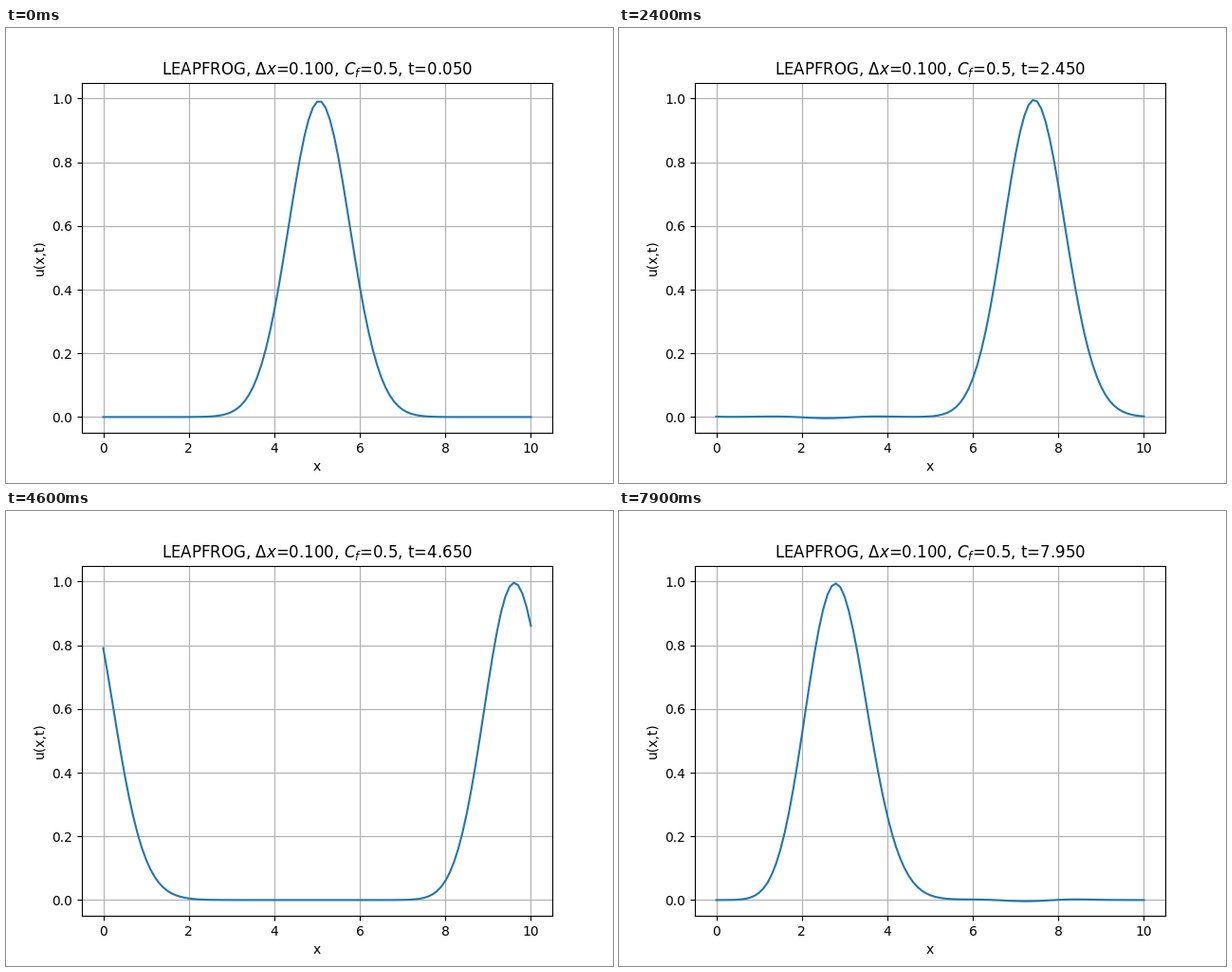
A matplotlib script for the animation above (8 s loop, 640 by 480 pixels).

```python
import numpy as np
import matplotlib.pyplot as plt
from matplotlib.animation import FuncAnimation

FRAMES, INTERVAL = 80, 100
STEPS_PER_FRAME = 2
DX, CF = 0.1, 0.5
DT = CF * DX

x = np.linspace(0, 10, 101)


def left(u):
    return np.roll(u, 1)


def right(u):
    return np.roll(u, -1)


def solve(n_steps):
    """Periodic advection: Lax-Friedrichs start, then leapfrog."""
    u0 = np.exp(-(x - 5) ** 2)
    u1 = 0.5 * (right(u0) + left(u0)) - 0.5 * CF * (right(u0) - left(u0))
    levels = [u0, u1]
    for _ in range(n_steps - 1):
        u = levels[-1]
        levels.append(levels[-2] - CF * (right(u) - left(u)))
    return levels


levels = solve(STEPS_PER_FRAME * FRAMES)

fig, ax = plt.subplots(figsize=(6.4, 4.8), dpi=100)
line, = ax.plot(x, levels[0])
ax.set_xlim(-0.5, 10.5)
ax.set_ylim(-0.05, 1.05)
ax.set_xlabel("x")
ax.set_ylabel("u(x,t)")
ax.grid(True)
title = ax.set_title("")


def update(frame):
    step = STEPS_PER_FRAME * frame + 1
    line.set_ydata(levels[step])
    title.set_text(rf"LEAPFROG, $\Delta x$={DX:.3f}, $C_f$={CF}, t={step * DT:.3f}")
    return line, title


anim = FuncAnimation(fig, update, frames=FRAMES, interval=INTERVAL,
                     repeat=True, repeat_delay=0, blit=False)
plt.show()
```
